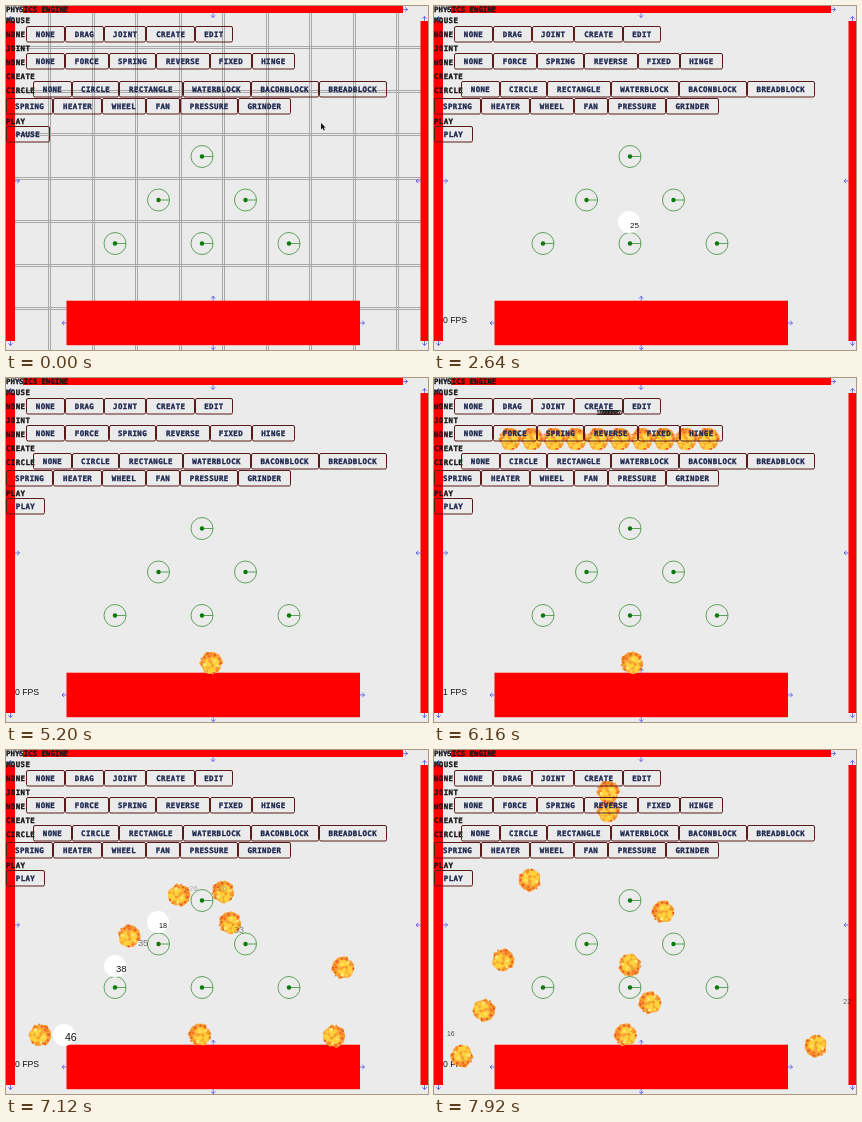
Animation of 422 by 344 pixels, one loop 8000 ms. Source, as an HTML page with a canvas:

```html
<!DOCTYPE html>
<html lang="en">
<head>
<meta charset="utf-8">
<title>Physics engine</title>
<style>
html, body { margin: 0; width: 100%; height: 100%; overflow: hidden; background: #ebebeb; }
canvas, svg { position: absolute; left: 0; top: 0; display: block; }
text {
  font: bold 7.4px "DejaVu Sans Mono", "Liberation Mono", monospace;
  letter-spacing: .4px; fill: #1d2850; stroke: #1d2850; stroke-width: .35px;
}
.label { fill: #181818; stroke: #181818; }
.title { letter-spacing: 0; }
rect { fill: none; stroke: #5a1a1a; stroke-width: 1; }
</style>
</head>
<body>
<canvas id="stage" width="422" height="344"></canvas>
<svg id="menu" width="422" height="344" viewBox="0 0 422 344"></svg>
<script>
const LOOP = 8000, STEP = 80, START = 720;
const G = 486, R = 11, LEFT = 20, RIGHT = 404, DAMAGE = 10.2;
const ctx = document.getElementById('stage').getContext('2d');
const menu = document.getElementById('menu');
const rand = k => Math.abs(Math.sin(k * 12.9898) * 43758.5453) % 1;
const mix = (a, b, u) => a + (b - a) * u;

// ---- Menu ----
function add(tag, attrs, text = '') {
  const el = document.createElementNS('http://www.w3.org/2000/svg', tag);
  for (const k in attrs) el.setAttribute(k, attrs[k]);
  el.textContent = text;
  return menu.appendChild(el);
}
const label = (text, y, cls = '') => add('text', { class: 'label ' + cls, x: 0, y: y + 2.7 }, text);

// Button width follows the word; the letter I is narrow
const widthOf = word => 19.6 + 4.85 * word.length - (word.includes('I') ? 1.4 : 0);

function buttons(x, y, words) {
  for (const word of words.split(' ')) {
    const end = x + widthOf(word), left = Math.round(x);
    add('rect', { x: left + .5, y: y + .5, width: Math.round(end) - left - 1, height: 15.5, rx: 1.5 });
    add('text', { x: (x + end) / 2, y: y + 10.7, 'text-anchor': 'middle' }, word);
    x = end;
  }
}

label('PHYSICS ENGINE', 3.5, 'title');
label('MOUSE', 14);
label('NONE', 28);
buttons(20, 20, 'NONE DRAG JOINT CREATE EDIT');
label('JOINT', 42);
label('NONE', 56);
buttons(20, 47, 'NONE FORCE SPRING REVERSE FIXED HINGE');
label('CREATE', 70);
label('CIRCLE', 84);
buttons(27, 75, 'NONE CIRCLE RECTANGLE WATERBLOCK BACONBLOCK BREADBLOCK');
buttons(0, 92, 'SPRING HEATER WHEEL FAN PRESSURE GRINDER');
label('PLAY', 115);
buttons(0, 120, 'PAUSE');
const toggleWord = menu.lastChild, toggleBox = toggleWord.previousSibling;

function setToggle(word) {
  const w = widthOf(word);
  toggleWord.textContent = word;
  toggleWord.setAttribute('x', w / 2);
  toggleBox.setAttribute('width', Math.round(w) - 1);
}

// ---- World ----
const walls = [[17, 0, 380, 7], [0, 15, 9, 320], [414.5, 15, 8, 320], [60.5, 294.7, 293.5, 44.5]];
const pegs = [];
for (let r = 0; r < 3; r++)
  for (let c = 0; c <= r; c++) pegs.push([196 + (c - r / 2) * 87, 150.5 + r * 43.5]);

const hits = [];
const hit = (t, x, y, n) => hits.push({ t, x, y, n: Math.round(n) });

// A path is a list of [time, x, y, damage on arrival], flown in parabolas
const roller = [
  [2080, 195, 150], [2640, 195, 216, 25], [3040, 196, 216], [3360, 199, 216],
  [3680, 206, 218], [4000, 217, 244], [4400, 214, 285]
];

// Where each dropped ball is at 7120 and 7920; x beyond a wall is mirrored back
const mid = [[34, 285], [58, 285, 46], [109, 216, 38], [123, 186], [152, 172, 18],
  [173, 145], [217, 142], [224, 173], [328, 286], [337, 218]];
const end = [[-100, 813], [12, 306], [50, 260], [69, 210], [96, 130],
  [196, 215], [229, 162], [216, 253], [385, 400], [426, 296]];

// First peg met in free fall from (x, 61) while drifting towards a point
function touch(x, toX) {
  for (let s = 0; s < .96; s += .01) {
    const px = mix(x, toX, (s / .96) ** 2), py = 61 + G / 2 * s * s;
    if (pegs.some(p => Math.hypot(p[0] - px, p[1] - py) < 2 * R))
      return [6160 + s * 1000, px, py, G * s / DAMAGE];
  }
}

function wallHit([x0, y0], [x1, y1]) {
  const edge = x1 < LEFT ? LEFT : x1 > RIGHT ? RIGHT : null;
  if (edge === null) return;
  const T = .8, u = (edge - x0) / (x1 - x0);
  const vy = (y1 - y0) / T + G * T * (u - .5);
  const y = mix(y0, y1, u) - G / 2 * T * T * u * (1 - u);
  hit(7120 + u * 800, edge + (edge === LEFT ? -8 : 4), y, Math.hypot((x1 - x0) / T, vy) / DAMAGE);
}

const drops = mid.map((m, i) => {
  const x = 76 + i * 22;
  const path = [[6080, mix(175, x, .7), 61], [6160, x, 61]];
  const bump = !m[2] && touch(x, m[0]);
  if (bump) path.push(bump);
  path.push([7120, ...m], [7920, ...end[i]], [8000, ...end[i]]);
  wallHit(m, end[i]);
  return path;
});
const late = [-1, 1].map(s => [[7840, 174, 51.5 + s * 6], [7920, 174, 51.5 + s * 9.5], [8000, 174, 51.5 + s * 10]]);
const balls = [roller, ...drops, ...late];
for (const path of balls) path.forEach(p => p[3] && hit(...p));

function place(path, t) {
  if (t < path[0][0]) return null;
  const i = path.findIndex(p => p[0] > t);
  if (i < 0) return [187 + 18 * Math.exp((5200 - t) / 1950), 285];
  const [t0, x0, y0] = path[i - 1], [t1, x1, y1] = path[i];
  const T = (t1 - t0) / 1000, u = (t - t0) / (t1 - t0);
  let x = mix(x0, x1, u);
  if (x < LEFT) x = 2 * LEFT - x;
  if (x > RIGHT) x = 2 * RIGHT - x;
  return [x, mix(y0, y1, u) - G / 2 * T * T * u * (1 - u)];
}

// ---- Drawing ----
function disc(x, y, r, fill) {
  ctx.beginPath();
  ctx.arc(x, y, r, 0, 7);
  ctx.fillStyle = fill;
  ctx.fill();
}

// Ragged ball of seeded patches: red and orange at the rim, yellow inside
function fire(x, y, angle) {
  ctx.save();
  ctx.translate(x, y);
  ctx.rotate(angle);
  ctx.beginPath();
  for (let k = 0; k < 22; k++) {
    const a = k / 22 * Math.PI * 2, r = 9.8 + 2.6 * rand(k + 1);
    ctx.lineTo(r * Math.cos(a), r * Math.sin(a));
  }
  ctx.fillStyle = '#f9a636';
  ctx.fill();
  for (let k = 30; k < 85; k++) {
    const d = 10.5 * Math.sqrt(rand(k)), a = rand(k + 100) * Math.PI * 2;
    const px = d * Math.cos(a), py = d * Math.sin(a), c = rand(k + 200);
    const rim = d - py * .25 > 7.6;
    const fill = rim ? (c < .4 ? '#ea5426' : '#f48a2c') : (c < .2 ? '#f79a2c' : c < .8 ? '#ffd23c' : '#ffe774');
    disc(px, py, rim ? 1.1 : 1.8, fill);
  }
  ctx.restore();
}

function drawGrid() {
  ctx.beginPath();
  for (let k = 1; k < 10; k++)
    for (const d of [-1, 1]) {
      const x = Math.floor(k * 43.5) + d + .5, y = x - 2;
      ctx.moveTo(x, 0); ctx.lineTo(x, 344);
      ctx.moveTo(0, y); ctx.lineTo(422, y);
    }
  ctx.lineWidth = 1;
  ctx.strokeStyle = '#a8a8a8';
  ctx.stroke();
}

function drawWall([x, y, w, h]) {
  ctx.fillStyle = '#f00';
  ctx.fillRect(x, y, w, h);
  ctx.strokeStyle = '#5050e0';
  ctx.lineWidth = .8;
  for (let turn = 0; turn < 4; turn++) {
    ctx.save();
    ctx.translate(x + w / 2, y + h / 2);
    ctx.rotate(turn * Math.PI / 2);
    ctx.translate((turn % 2 ? h : w) / 2 + 4.5, 0);
    ctx.beginPath();
    ctx.moveTo(-4.5, 0); ctx.lineTo(0, 0);
    ctx.moveTo(-2.2, -2.2); ctx.lineTo(0, 0); ctx.lineTo(-2.2, 2.2);
    ctx.stroke();
    ctx.restore();
  }
}

function drawPeg([x, y]) {
  ctx.beginPath();
  ctx.arc(x, y, R, 0, 7);
  ctx.moveTo(x, y);
  ctx.lineTo(x + R, y);
  ctx.strokeStyle = '#4f9a4f';
  ctx.lineWidth = .9;
  ctx.stroke();
  disc(x, y, 2.2, '#087808');
}

function write(text, x, y, size, alpha = 1) {
  ctx.font = `${size}px "Liberation Sans", Arial, sans-serif`;
  ctx.fillStyle = `rgba(20,20,20,${alpha})`;
  ctx.fillText(text, x, y);
}

function drawCursor(t) {
  const u = Math.min(1, t / 160);
  ctx.save();
  if (t < 400) ctx.translate(mix(315, 343, u), mix(117, 157, u));
  else ctx.translate(20, 126);
  ctx.fillStyle = '#111';
  ctx.fill(new Path2D('M0 0V6.5L1.5 5 2.8 7.5 3.8 7 2.7 4.6H4.6Z'));
  ctx.restore();
}

function drawHits(t) {
  for (const h of hits) {
    const age = (t - h.t) / 1000;
    if (age < 0 || age > .7) continue;
    if (age < .12) disc(h.x, h.y, R, '#fff');
    write(h.n, h.x + 1, h.y + 6, 5 + h.n * .12, (1 - age / .7) ** 1.5);
  }
  // Pile of readings from the balls pushing each other apart
  const age = (t - 6080) / 700;
  if (age >= 0 && age < 1)
    for (let k = 0; k < 20; k++) write(10 + k * 7 % 19, 162 + k, 37, 6.3, 1 - age);
}

function draw(t) {
  const playing = t >= START;
  ctx.fillStyle = '#ebebeb';
  ctx.fillRect(0, 0, 422, 344);
  if (!playing) drawGrid();
  walls.forEach(drawWall);
  if (playing) write((t >= 6080 && t < 6400 ? 1 : 0) + ' FPS', 9, 317, 8.7);
  pegs.forEach(drawPeg);
  const flashes = hits.filter(h => t >= h.t && t < h.t + 120);
  balls.forEach((path, i) => {
    const p = place(path, t);
    if (!p || flashes.some(h => Math.hypot(h.x - p[0], h.y - p[1]) < 4)) return;
    const spin = path === roller ? (p[0] - 205) / R : Math.max(0, t - 6400) / 500 * Math.sin(i * 2.3);
    fire(p[0], p[1], late.includes(path) ? 0 : spin);
  });
  drawHits(t);
  if (!playing) drawCursor(t);
  setToggle(playing ? 'PLAY' : 'PAUSE');
}

const origin = performance.now();
function tick() {
  const t = (performance.now() - origin) % LOOP;
  draw(Math.floor(t / STEP) * STEP);
  requestAnimationFrame(tick);
}
tick();
</script>
</body>
</html>
```
